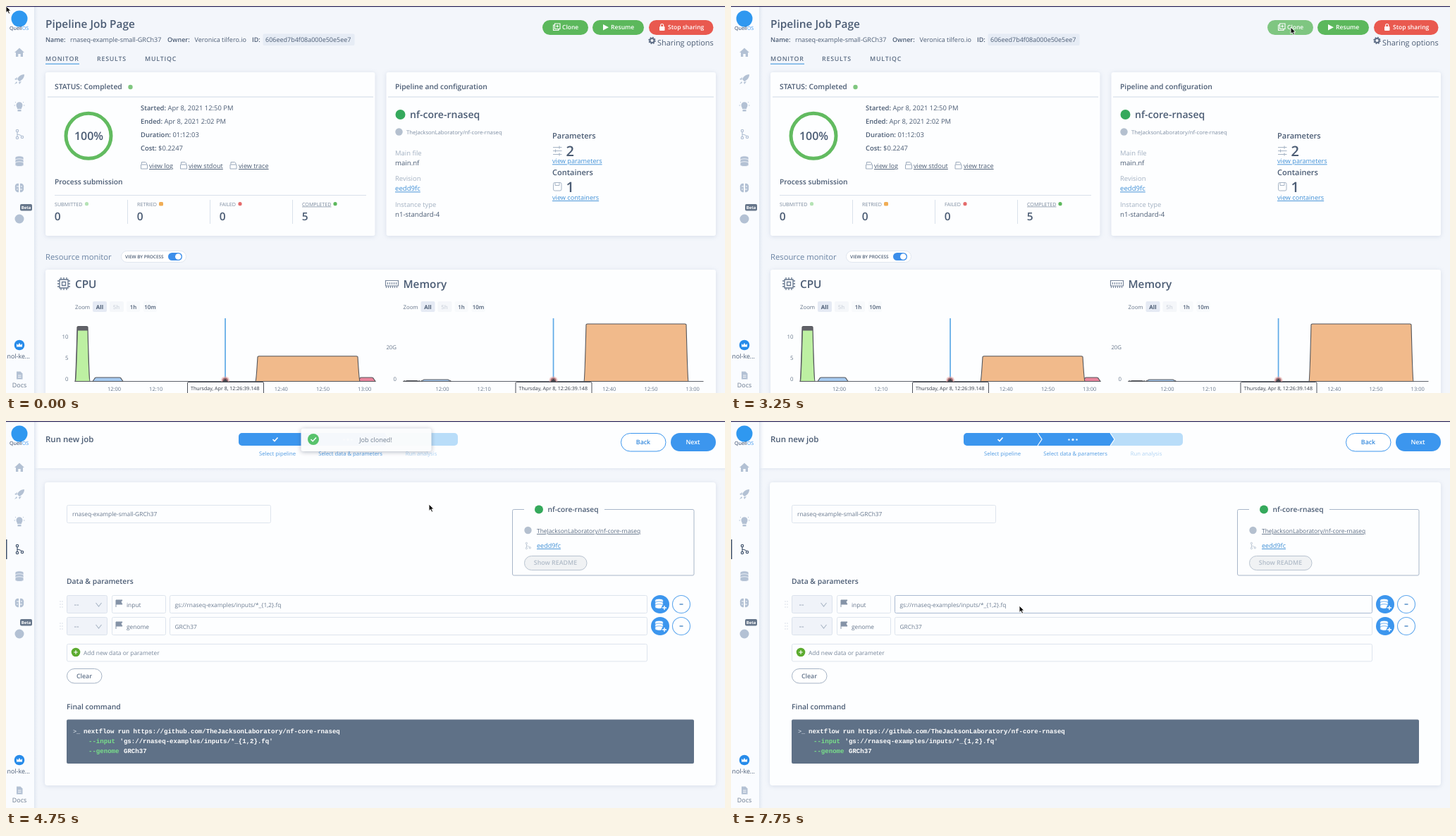
An HTML page that plays this animation: 1020x549 px, repeating every 8 s.

```html
<!DOCTYPE html>
<html lang="en">
<head>
<meta charset="utf-8">
<title>Pipeline job</title>
<style>
html, body { margin: 0; width: 100%; height: 100%; overflow: hidden; background: #f3f6fb; }
svg { display: block; width: 1020px; height: 549px; font-family: "Open Sans", "Noto Sans", sans-serif; text-rendering: geometricPrecision; }
.u { text-decoration: underline; }
.mono { font-family: "Liberation Mono", monospace; }
.mid { text-anchor: middle; }
.end { text-anchor: end; }
.panel { fill: #fdfeff; filter: drop-shadow(0 1px 3px rgba(70, 95, 140, .16)); }
.line { fill: none; stroke: #d9e1eb; }
.icon { fill: none; stroke: #b3c1d4; stroke-width: 1.3; }
</style>
</head>
<body>
<svg id="stage" viewBox="0 0 1020 549"></svg>
<script>
const INK = '#4b5c74', SOFT = '#a3b1c2', BLUE = '#3c96ee', LINK = '#3f8fd6', GREEN = '#5cb85c', GREY = '#b3c1d4';

const text = (x, y, s, size = 9, fill = INK, weight = 400, attr = '') =>
  `<text x="${x}" y="${y}" font-size="${size}" fill="${fill}" font-weight="${weight}" ${attr}>${s}</text>`;
const mid = (x, y, s, size, fill, weight) => text(x, y, s, size, fill, weight, 'class="mid"');
const link = (x, y, s, size, fill = LINK) => text(x, y, s, size, fill, 400, 'class="u"');
const rect = (x, y, w, h, fill, r = 0, attr = '') =>
  `<rect x="${x}" y="${y}" width="${w}" height="${h}" rx="${r}" fill="${fill}" ${attr}/>`;
const box = (x, y, w, h, stroke = '#dde4ed', fill = '#fdfeff', r = 2, attr = '') =>
  rect(x + .5, y + .5, w, h, fill, r, `stroke="${stroke}" ${attr}`);
const dot = (x, y, r, fill, attr = '') => `<circle cx="${x}" cy="${y}" r="${r}" fill="${fill}" ${attr}/>`;
const path = (d, fill = 'none', stroke = 'none', w = 1, attr = '') =>
  `<path d="${d}" fill="${fill}" stroke="${stroke}" stroke-width="${w}" ${attr}/>`;
const line = (d, stroke = '#d9e1eb', w = 1) => path(d, 'none', stroke, w);
const at = (x, y, s) => `<g transform="translate(${x} ${y})">${s}</g>`;
const group = (id, s, attr = '') => `<g id="${id}" ${attr}>${s}</g>`;

// Small icons, drawn around their centre
const branch = c => line('M-3 -3.5V4M-3 1C-3 -1 3.5 1.5 4 4', c, 1.2) +
  dot(-3, -5, 1.7, '#fafcff', `stroke="${c}" stroke-width="1.2"`) +
  dot(-3, 5, 1.7, '#fafcff', `stroke="${c}" stroke-width="1.2"`) +
  dot(4, 4, 1.7, '#fafcff', `stroke="${c}" stroke-width="1.2"`);
const database = (c, gap) => [-4, 0, 4].map(y =>
  path(`M-6 ${y - 1}a6 2.2 0 0 1 12 0v2.4a6 2.2 0 0 1 -12 0z`, c, gap, .8)).join('');
const doc = line('M-3.5 -2V-5H2L3.5 -3.5V-2M-4.5 -1.5H4.5V4.5H-4.5z', '#9caabc', 1);
const flag = path('M-4 -5V5M-4 -5H5L3 -2.2L5 1H-4', '#8593a7', '#8593a7', 1);
const plus = (r, c, w) => line(`M${-r} 0H${r}M0 ${-r}V${r}`, c, w);

function sidebar() {
  return rect(0, 0, 40, 549, '#fafcff') + rect(40, 0, 7, 549, 'url(#edge)') +
    dot(19, 18, 11.5, '#2f98f0') +
    text(5, 33.5, `Quell<tspan fill="${BLUE}">OS</tspan>`, 7.2, '#2d4163') +
    at(19, 66, path('M-7 0L0 -6.5L7 0H5V6H1.7V2H-1.7V6H-5V0z', GREY)) +
    at(19, 104, path('M7 -7C1 -7 -2 -3 -3 0L0 3C4 1 7 -2 7 -7zM-3 -3L-7 0L-4 1zM3 3L0 7L-1 4zM-4 3L-7 7L-3 5z', GREY)) +
    at(19, 143, path('M-3 3C-3 1 -4.5 0 -4.5 -2.2A4.5 4.5 0 0 1 4.5 -2.2C4.5 0 3 1 3 3zM-2.5 4H2.5V6.5H-2.5z', GREY) +
      line('M-7.5 -2H-6M6 -2H7.5M-6 -7L-5 -6M6 -7L5 -6', GREY, 1)) +
    group('navPlain', at(19, 182, branch(GREY))) +
    group('navActive', at(19, 182, branch('#44566f')) + rect(0, 168, 1.5, 28, '#44566f')) +
    at(19, 220, database(GREY, '#fafcff')) +
    at(19, 258, path('M-1 -6C-5 -7 -7 -3 -6 0C-7 4 -4 7 -1 6zM1 -6C5 -7 7 -3 6 0C7 4 4 7 1 6z', GREY) +
      line('M-4 -2H-1M-4 2H-2M4 -2H2M4 2H1', '#fafcff', 1)) +
    dot(19, 302, 6.5, GREY) +
    rect(20, 281, 17, 9.5, '#66768b', 2) + mid(28.5, 288, 'Beta', 5.8, '#fff', 700) +
    dot(19, 481, 7.3, '#268bea') + at(19, 481, path('M-4 2.5V-2L-2 0L0 -3L2 0L4 -2V2.5z', '#fff')) +
    text(1.5, 500, 'nol-ke...', 8.9) +
    at(19, 524, path('M-4 -5.5H1.5L4.5 -2.5V5.5H-4z', GREY) + line('M-2 0H2.5M-2 2.5H2.5', '#fff', .9)) +
    mid(19, 540.5, 'Docs', 8.9, '#67778c');
}

function counts() {
  const items = [[69, 'SUBMITTED', 0, 114.5, '#b5e3b5'], [186, 'RETRIED', 0, 220, '#f0ad55'],
    [303, 'FAILED', 0, 332, '#e56b6b'], [420, 'COMPLETED', 5, 467, GREEN]];
  return items.map(([x, label, n, dx, c], i) =>
    text(x, 283.6, label, 7.15, '#7a899d', 400, i == 3 ? 'class="u"' : '') +
    (i == 1 ? rect(dx - 3, 278, 6, 5.5, c, 1.5) : dot(dx, 280.7, 2.6, c)) +
    text(x - .3, 304, n, 15.5, INK, 600) +
    (i ? line(`M${x - 13.5} 275V309`) : '')).join('');
}

function chart(x, title, ticks, shapes) {
  const zoom = [['All', 133, INK], ['5h', 156.5, '#cfd5de'], ['1h', 180.5, INK], ['10m', 204.5, INK]];
  const hours = ['12:00', '12:10', '12:20', '12:30', '12:40', '12:50', '13:00'];
  return at(x, 0,
    text(98, 400, title, 15.3, INK, 600) + text(98, 429.5, 'Zoom', 7.8, '#66758a') +
    rect(123, 419, 20, 15, '#e5eaf4', 2) + rect(147, 419, 20, 15, '#f5f7fa', 2) +
    rect(171, 419, 19, 15, '#f8fafc', 2) + rect(195, 419, 19, 15, '#f8fafc', 2) +
    zoom.map(([s, cx, c]) => mid(cx, 429.5, s, 7.9, c, s == 'All' ? 700 : 600)).join('') +
    ticks.map(([s, y]) => text(88.5, y, s, 7.8, '#66758a', 400, 'class="end"')).join('') +
    line('M98 532.5H524', '#5e626b') + shapes +
    hours.map((s, i) => mid(153.5 + 59.2 * i, 545.5, s, 7.5, '#66758a')).join('') +
    rect(310.2, 443, 1.7, 89, '#5eaae6') +
    dot(311, 531.5, 6, '#e4a4a4', 'opacity=".6"') + dot(311, 531.5, 4, '#a46b70') +
    path('M307 533L311 528.5L315 533z', '#45464e') +
    rect(257.5, 533.5, 108, 20, '#fdfdfd', 1.5, 'stroke="#4d5058"') +
    text(262, 544.8, 'Thursday, Apr 8, 12:26:39.148', 7.1, '#333b47'));
}

const hump = (a, b, y, fill, lean = 3) =>
  path(`M${a} 532.5Q${a + 1} 531 ${a + lean} ${y + 1}Q${a + lean} ${y} ${a + lean + 2} ${y}H${b - lean - 2}Q${b - lean} ${y} ${b - lean} ${y + 1}Q${b - 1} 531 ${b} 532.5z`, fill, '#54565c', 1.1);

function charts() {
  const cpu = hump(98, 119, 454.5, '#616268') + path('M99 532Q100 530 102 460.5H115.5Q117 530 118.5 532z', '#bdf0a2') +
    hump(123, 166, 527, '#a6caf0') + hump(499, 524, 527, '#e9859c') + hump(354, 502, 496.8, '#f1ba8b');
  const memory = hump(98.5, 122, 531.6, '#616268') + hump(123, 166, 530, '#a6caf0') + hump(354.5, 502.5, 451, '#f1ba8b');
  const pins = [-4, 0, 4].map(p => `M${p} -9V-6M${p} 6V9M-9 ${p}H-6M6 ${p}H9`).join('');
  return chart(0, 'CPU', [['10', 472], ['5', 502], ['0', 532]], cpu) +
    chart(465.5, 'Memory', [['20G', 486.5], ['0', 532]], memory) +
    at(82, 394, line('M-6 -6H6V6H-6zM-2.5 -2.5H2.5V2.5H-2.5z' + pins, '#66778f', 1.3)) +
    at(547.5, 394, line('M-9 -4.5H9V3H-9zM-6 -2V1M-3 -2V1M0 -2V1M3 -2V1M6 -2V1M-8 3V6M-5 3V6M-2 3V6M1 3V6M4 3V6M7 3V6', '#7a889d', 1.2));
}

function monitorPage() {
  const facts = [['Started', 'Apr 8, 2021 12:50 PM'], ['Ended', 'Apr 8, 2021 2:02 PM'], ['Duration', '01:12:03'], ['Cost', '$0.2247']];
  const logs = [[196, 203, 'log'], [252, 259, 'stdout'], [322.5, 330, 'trace']];
  return text(56, 31, 'Pipeline Job Page', 15.4, INK, 600) +
    text(56, 51, 'Name:', 9, INK, 600) + text(91, 51, 'rnaseq-example-small-GRCh37') +
    text(229, 51, 'Owner:', 9, INK, 600) + text(267.5, 51, 'Veronica tilfero.io') +
    text(349, 51, 'ID:', 9, INK, 600) + rect(364.5, 39.5, 130, 16.5, '#e6ecf5', 2) +
    text(368, 51, '606eed7b4f08a000e50e5ee7') +
    [[56, 'MONITOR'], [129, 'RESULTS'], [197, 'MULTIQC']].map(([x, s]) =>
      text(x, 78, s, 8.8, '#5a6b82', 600, 'letter-spacing=".8"')).join('') +
    rect(56, 81.5, 48, 1.4, '#67abe4') +
    group('clone', rect(761, 20, 65, 21, GREEN, 10.5) +
      line('M778.5 27H776.5V34.5H784V32.5M778.5 25H786V32.5H778.5zM782.2 26.7V30.8M780.2 28.7H784.2', '#fff', 1.1) +
      text(789, 33, 'Clone', 8.5, '#fff', 600)) +
    rect(832, 20, 73, 21, GREEN, 10.5) + path('M847 26L855 30.3L847 34.6z', '#fff') + text(858, 33, 'Resume', 8.6, '#fff', 600) +
    rect(912, 20, 91.5, 21, '#e9594f', 10.5) + rect(927, 29, 7.5, 6, '#fff', 1) +
    line('M928.7 29V27.5a2 2 0 0 1 4 0V29', '#fff', 1.2) + text(939, 33, 'Stop sharing', 8.5, '#fff', 600) +
    dot(916.5, 49, 3.1, 'none', 'stroke="#5c6c84" stroke-width="2"') +
    dot(916.5, 49, 4.5, 'none', 'stroke="#5c6c84" stroke-width="1.4" stroke-dasharray="1.8 1.73"') +
    text(924, 56, 'Sharing options', 10.9) +

    rect(56, 94, 467.5, 232, '', 3, 'class="panel"') + rect(539.5, 94, 467.5, 232, '', 3, 'class="panel"') +
    line('M59 129H521M542 129H1004', '#cfd9e5') +
    text(69, 118, 'STATUS: Completed', 10.3, INK, 600) + dot(176.5, 115, 3.2, '#7fc67f') +
    dot(117, 184.3, 32, 'none', 'stroke="#62bb60" stroke-width="5"') + mid(117.5, 190, '100%', 16, INK, 600) +
    facts.map(([k, v], i) => text(191, 147.6 + 19 * i, `<tspan font-weight="600">${k}:</tspan> ${v}`, 9.45)).join('') +
    logs.map(([ix, x, s]) => at(ix, 226.5, doc) + link(x, 230, 'view ' + s, 9.15, INK)).join('') +
    text(69, 253, 'Process submission', 10.25, INK, 600) + line('M69 268.5H511') + counts() +

    text(552, 118, 'Pipeline and configuration', 10.3, INK, 600) +
    dot(559.5, 154, 7, '#35a95c') + text(573, 159, 'nf-core-rnaseq', 14.05, INK, 600) +
    dot(557.5, 178.5, 5.2, '#b4c0cf') + text(568, 182, 'TheJacksonLaboratory/nf-core-rnaseq', 7.72, '#7e8ea3') +
    text(552, 212.4, 'Main file', 9.45, SOFT) + text(552, 226.4, 'main.nf', 9.65) +
    text(552, 248.4, 'Revision', 9.45, SOFT) + link(552, 262.4, 'eedd9fc', 9.6) +
    text(552, 284.9, 'Instance type', 9.4, SOFT) + text(552, 299, 'n1-standard-4', 9.65) +
    text(775, 188, 'Parameters', 11, INK, 600) + text(775, 239.5, 'Containers', 11, INK, 600) +
    line('M776 200.5H788.5M776 205.5H788.5M776 210.5H788.5M785 198.5V202.5M779.5 203.5V207.5M785 208.5V212.5', '#a6b4c5', 1.1) +
    box(776, 250, 11.5, 11.5, '#a6b4c5', '#fdfeff', 2) + line('M779 251V254.5H785V251', '#a6b4c5') +
    text(794.5, 212.5, '2', 20, INK, 600) + text(794.5, 263.5, '1', 20, INK, 600) +
    link(775, 223.4, 'view parameters', 9.13) + link(775, 275, 'view containers', 9.13) +

    text(56, 360, 'Resource monitor', 11.25, '#6a83a3', 500) +
    box(163, 347, 92, 16, '#e0e6ef', '#fff', 8) + text(169, 358, 'VIEW BY PROCESS', 6.4, INK, 600) +
    rect(230, 350, 20, 11, '#3c8eea', 5.5) + dot(244.3, 355.5, 4.3, '#fff') +
    rect(56, 374, 951, 190, '', 3, 'class="panel"') + charts();
}

function paramRow(y, name, value, id) {
  const grip = [0, 4, 8].map(d => dot(77, y - 4 + d, .7, '#ccd5e0') + dot(80, y - 4 + d, .7, '#ccd5e0')).join('');
  return grip + box(86, y - 13, 57, 25, '#dbe2ec', '#f0f3f9') + text(96.5, y + 3.5, '--', 11, '#8b99ac') +
    line(`M127.5 ${y - 2}L131.5 ${y + 3}L135.5 ${y - 2}`, '#a9b6c6', 1.1) +
    box(150, y - 13, 76, 25) + at(160, y - 1, flag) + text(171, y + 3.7, name, 8.4, '#67778d') +
    box(232, y - 13, 677, 25, '#dde4ed', '#fdfeff', 2, `id="${id}"`) +
    group(id + 'Pick', rect(0, y - 5.5, 0, 12, '#3a87d8')) +
    text(239.5, y + 3.5, value, 8.37, '#6d7d92', 400, `id="${id}Text"`) +
    dot(928, y, 13, BLUE) + at(926.5, y - 1, `<g transform="scale(.95)">${database('#fff', BLUE)}</g>`) +
    dot(934, y + 5, 4, BLUE) + at(934, y + 5, plus(3, '#fff', 1.4)) +
    dot(958, y, 12.5, '#fdfeff', 'stroke="#62a9ee" stroke-width="1.1"') + line(`M955.5 ${y}H960.5`, '#3f7fc0', 1.3);
}

function terminal() {
  const mono = (x, y, s, c = '#fff') => text(x, y, s, 9.05, c, 700, 'class="mono"');
  return rect(86, 423.5, 890, 62.5, '#5f7187', 2) +
    text(95, 443, '&gt;_', 8.5, '#e7edf4', 400, 'class="mono"') +
    mono(110, 443, 'nextflow run https://github.com/TheJacksonLaboratory/nf-core-rnaseq') +
    mono(117, 457, '--input', '#79e08a') + mono(161.5, 457, "'gs://rnaseq-examples/inputs/*_{1,2}.fq'") +
    mono(117, 471, '--genome', '#79e08a') + mono(167, 471, 'GRCh37');
}

function clonePage() {
  return rect(40, 0, 980, 67.5, '#fdfeff') + rect(40, 67, 980, 6, 'url(#drop)') +
    text(56, 30, 'Run new job', 11.5, INK, 600) +
    rect(330, 17, 311, 18, '#b9ddf9', 5) +
    path('M335 17H538L544 26L538 35H335a5 5 0 0 1 -5 -5V22a5 5 0 0 1 5 -5z', BLUE) +
    line('M435 17L441 26L435 35M538 17L544 26L538 35', '#fdfeff', 1.2) +
    line('M378.5 26L381 28.5L385.5 23.5', '#fff', 1.6) +
    [479.5, 485, 490.5].map((x, i) => dot(x, 26.5, i == 1 ? 1.7 : 1.3, '#e2f1fe')).join('') +
    mid(385, 48.7, 'Select pipeline', 7.72, '#4f9ae2') + mid(488.5, 48.7, 'Select data &amp; parameters', 7.72, '#4f9ae2') +
    mid(589, 48.7, 'Run analysis', 7.72, '#b0d3f3') +
    box(872, 17, 63.5, 25.5, BLUE, '#fff', 13) + mid(904, 33, 'Back', 8.8, '#3489de', 600) +
    group('next', rect(943, 17, 64, 26, BLUE, 13) + mid(974.5, 33, 'Next', 8.8, '#fff', 600)) +

    rect(55, 87, 952, 430, '', 4, 'class="panel"') +
    box(86, 119, 289, 25) + text(94, 134.6, 'rnaseq-example-small-GRCh37', 8.4, '#67778d') +
    box(718, 125, 257.5, 93.5, '#a8b6c9') + rect(735, 122, 114, 8, '#fdfeff') +
    dot(756, 125.5, 6, '#35a95c') + text(768.5, 129, 'nf-core-rnaseq', 10.2, INK, 600) +
    dot(740.5, 155, 5.2, '#b4c0cf') + link(753, 159, 'TheJacksonLaboratory/nf-core-rnaseq', 8.38, '#596a81') +
    at(740.5, 177, `<g transform="scale(.7)">${branch('#b4c0cf')}</g>`) + link(753, 180, 'eedd9fc', 9.1) +
    box(735, 191, 88.5, 20, '#b8c3d0', '#f0f2f4', 10) + mid(779.5, 204.3, 'Show README', 8.9, '#b0bbc8', 600) +
    text(86, 231, 'Data &amp; parameters', 10.35, INK, 600) +
    group('rows', paramRow(260, 'input', 'gs://rnaseq-examples/inputs/*_{1,2}.fq', 'field') +
      paramRow(291, 'genome', 'GRCh37', 'genome')) +
    box(86, 316, 823, 24.5) + dot(99, 328, 6.3, '#5cab2f') + at(99, 328, plus(2.8, '#fff', 1.2)) +
    text(110, 331.7, 'Add new data or parameter', 8.38, '#78879b') +
    box(86, 351, 49.5, 20.5, '#a5b3c5', '#fff', 10.5) + mid(111, 365, 'Clear', 8.9, '#62738a', 600) +
    text(86, 409, 'Final command', 10.35, INK, 600) + terminal() +
    group('toast', rect(418.5, 10.5, 185, 32.5, '#fbfcfd', 3, 'style="filter:drop-shadow(0 1px 3px rgba(60,75,100,.4))"') +
      dot(436, 26, 8, '#58c468') + line('M432.5 26L435.2 28.7L440 23.5', '#fff', 1.6) +
      mid(524.5, 29.8, 'Job cloned!', 9.1, '#75808f'));
}

const stage = document.getElementById('stage');
stage.innerHTML = `<defs>
  <linearGradient id="edge"><stop stop-color="#dfe6f0"/><stop offset="1" stop-color="#f3f6fb" stop-opacity="0"/></linearGradient>
  <linearGradient id="drop" x2="0" y2="1"><stop stop-color="#e3e9f2"/><stop offset="1" stop-color="#f3f6fb" stop-opacity="0"/></linearGradient>
  </defs>` + rect(0, 0, 1020, 549, '#f3f6fb') +
  group('monitor', monitorPage()) + group('cloned', clonePage()) + sidebar() +
  rect(0, 0, 1020, 1.2, '#2a2458') +
  group('status', path('M0 538.5H335a3 3 0 0 1 3 3V549H0z', '#24262b') + text(2, 548.7, '', 8.9, '#fff', 600)) +
  group('cursor', path('M0 0V9.6L2.2 7.6L3.8 11.2L5.6 10.4L4 6.9H7z', '#111', '#fff', .9));

const part = Object.fromEntries([...stage.querySelectorAll('[id]')].map(e => [e.id, e]));
const show = (el, on) => el.setAttribute('opacity', Number(on));

// time, x, y of the pointer
const POINTER = [[750, 800, 50], [1000, 786, 45], [1250, 769, 26], [1500, 758, 31], [1750, 758, 46],
  [2000, 764, 49], [2250, 768, 37], [2500, 762, 22], [2750, 775, 25], [3000, 788, 29], [3250, 794, 30],
  [4500, 740, 52], [4750, 600, 118], [5000, 430, 200], [5250, 300, 250], [5500, 251.5, 261.5],
  [5750, 395, 262], [6000, 300, 262], [6250, 92, 262], [6500, 250, 262], [6750, 409, 262]];
const LOOP = 8000, STEP = 250, PICK_LEFT = 239.5, PICK_RIGHT = 391;

function draw(now) {
  const t = Math.floor((now % LOOP) / STEP) * STEP;
  const pose = POINTER.filter(p => p[0] <= t).pop();
  const [, x, y] = pose || [0, 0, 0];
  const cloned = t >= 4250;
  show(part.cursor, pose);
  part.cursor.setAttribute('transform', `translate(${x} ${y})`);

  part.monitor.style.display = cloned ? 'none' : '';
  part.cloned.style.display = cloned ? '' : 'none';
  show(part.navPlain, !cloned);
  show(part.navActive, cloned);

  const hover = pose && x >= 761 && x <= 826 && y >= 20 && y <= 41;
  show(part.clone, hover ? .76 : 1);

  show(part.status, t < 3750 || t >= 4500 ? 0 : cloned ? .05 : 1);
  part.status.lastChild.textContent = cloned ? '' : `Uploading (${t < 4000 ? 21 : 58}%)...`;

  show(part.rows, t < 4500 ? .5 : 1);
  show(part.next, t >= 5000 && t < 5750 ? .65 : 1);
  show(part.toast, t < 7000 ? .97 : t < 7250 ? .45 : 0);
  part.field.setAttribute('stroke', t >= 5500 ? '#a9bad2' : '#dde4ed');

  // Selection grows leftwards from the end of the value
  const dragging = t >= 6000 && t < 7250;
  const left = t < 6250 ? Math.max(PICK_LEFT, x) : PICK_LEFT;
  const pick = part.fieldPick.firstChild;
  pick.setAttribute('x', left);
  pick.setAttribute('width', dragging ? PICK_RIGHT - left : 0);
  part.fieldText.setAttribute('fill', dragging && t >= 6250 ? '#fff' : '#6d7d92');
}

const start = performance.now();
function tick() {
  draw(performance.now() - start);
  requestAnimationFrame(tick);
}
tick();
</script>
</body>
</html>
```
